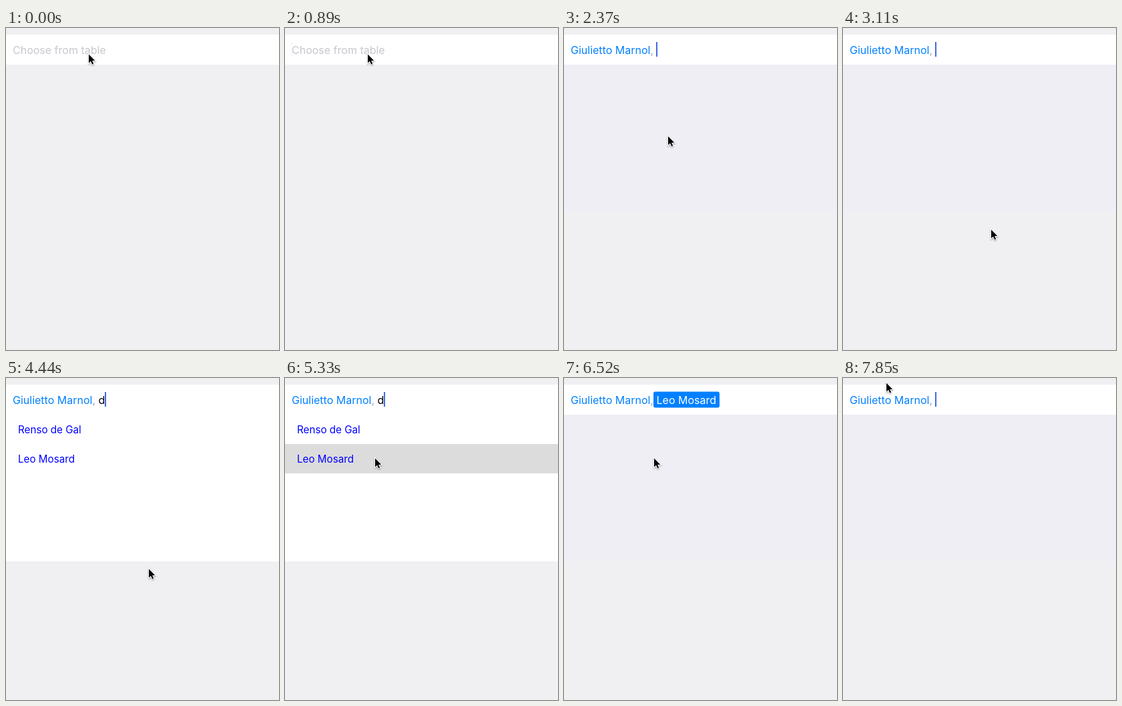
Animation of 409x483 px, one loop 8 s. Source, as an HTML page with a canvas:

```html
<!DOCTYPE html>
<html lang="en">
<head>
<meta charset="utf-8">
<title>Token field</title>
<style>
  html, body { margin: 0; width: 100%; height: 100%; overflow: hidden; background: #f0f0f3; }
  canvas { display: block; }
</style>
</head>
<body>
<canvas id="stage" width="409" height="483"></canvas>
<script>
const ctx = document.getElementById('stage').getContext('2d');
const LOOP = 8000;
const TICK = LOOP / 54;
const BLINK = 6 * TICK;
const FIELD = '16px Inter, sans-serif';
const LIST = '15.2px Inter, sans-serif';
const BASELINE = 39;
const TINT = '#0080ff';

const FIRST = 'Renso de Gal';
const SECOND = 'Giulietto Marnol';
const THIRD = 'Leo Mosard';

const states = [
  { from: 0, idle: true },
  { from: 290, placeholder: true },
  { from: 1180, typed: 'g', rows: [FIRST, SECOND] },
  { from: 2220, tokens: [SECOND] },
  { from: 4000, tokens: [SECOND], typed: 'd', rows: [FIRST, THIRD] },
  { from: 5180, tokens: [SECOND], typed: 'd', rows: [FIRST, THIRD], pressed: 1 },
  { from: 5480, tokens: [SECOND, THIRD] },
  { from: 6510, tokens: [SECOND], chip: THIRD },
  { from: 6960, tokens: [SECOND] }
];

const moves = [
  { start: 1480, end: 1780, x: 126, y: 102 },
  { start: 2220, end: 2660, x: 232, y: 321 },
  { start: 2660, end: 3110, x: 221, y: 301 },
  { start: 4300, end: 4440, x: 213, y: 285 },
  { start: 4440, end: 4740, x: 134, y: 119 },
  { start: 7110, end: 7850, x: 64, y: 6 }
];

const clamp = v => Math.min(1, Math.max(0, v));
const ease = v => v * v * (3 - 2 * v);

function pointerAt(t) {
  let x = 123, y = 38;
  for (const move of moves) {
    const k = ease(clamp((t - move.start) / (move.end - move.start)));
    x += (move.x - x) * k;
    y += (move.y - y) * k;
  }
  return [x, y];
}

// Solid after each edit, then a short fade out and back in
function caretAlpha(age) {
  return clamp((Math.abs(age % BLINK - 690) - 85) / 110);
}

function rect(x, y, w, h, color) {
  ctx.fillStyle = color;
  ctx.fillRect(x, y, w, h);
}

// Draws text and returns the x position after it
function write(text, x, y, color, font) {
  ctx.font = font;
  ctx.fillStyle = color;
  ctx.fillText(text, x, y);
  return x + ctx.measureText(text).width;
}

function drawList(rows, pressed) {
  rect(0, 55, 409, 220, '#fff');
  rows.forEach((name, i) => {
    const top = 55 + 44 * i;
    if (i === pressed) rect(0, top, 409, 44, '#dcdcdc');
    write(name, 18, top + 28, '#00f', LIST);
  });
}

function drawChip(name, x) {
  ctx.font = FIELD;
  const width = Math.round(ctx.measureText(name).width + 9);
  ctx.fillStyle = TINT;
  ctx.beginPath();
  ctx.roundRect(Math.round(x), 20.5, width, 24, 3);
  ctx.fill();
  write(name, x + 4.5, BASELINE, '#fff', FIELD);
}

function drawField({ idle, placeholder, tokens = [], typed = '', chip }, alpha) {
  rect(0, 10, 409, 45, '#fff');
  let x = 10;
  if (idle || placeholder) write('Choose from table', x, BASELINE, '#c7c7cd', FIELD);
  for (const name of tokens) {
    x = write(name, x, BASELINE, TINT, FIELD);
    x = write(',', x, BASELINE, '#8fadc8', FIELD);
    if (!chip) x = write(' ', x, BASELINE, TINT, FIELD);
  }
  x = write(typed, x, BASELINE, '#000', FIELD);
  if (chip) drawChip(chip, x);
  else if (!idle) {
    ctx.globalAlpha = alpha;
    rect(Math.round(x - .6), 21, 2, 22, '#4169e1');
    ctx.globalAlpha = 1;
  }
}

const arrow = new Path2D('M1 1.5V14.6L4 11.8L6.2 16.5L8.2 15.6L6.1 11H10.3Z');

function drawPointer(x, y) {
  ctx.save();
  ctx.translate(Math.round(x), Math.round(y));
  ctx.shadowColor = 'rgba(0,0,0,.4)';
  ctx.shadowBlur = 2;
  ctx.shadowOffsetY = 1;
  ctx.strokeStyle = '#fff';
  ctx.lineWidth = 2;
  ctx.stroke(arrow);
  ctx.shadowColor = 'transparent';
  ctx.fillStyle = '#000';
  ctx.fill(arrow);
  ctx.restore();
}

function draw(now) {
  // The picture advances in even ticks
  const t = Math.floor((now % LOOP + 10) / TICK) * TICK;
  const state = states.findLast(s => s.from <= t);
  rect(0, 0, 409, 483, '#f0f0f3');
  if (state.rows) drawList(state.rows, state.pressed);
  else if (state.tokens) rect(0, 55, 409, 220, '#efeef4');
  drawField(state, caretAlpha(t - state.from));
  drawPointer(...pointerAt(t));
  requestAnimationFrame(draw);
}
requestAnimationFrame(draw);
</script>
</body>
</html>
```
